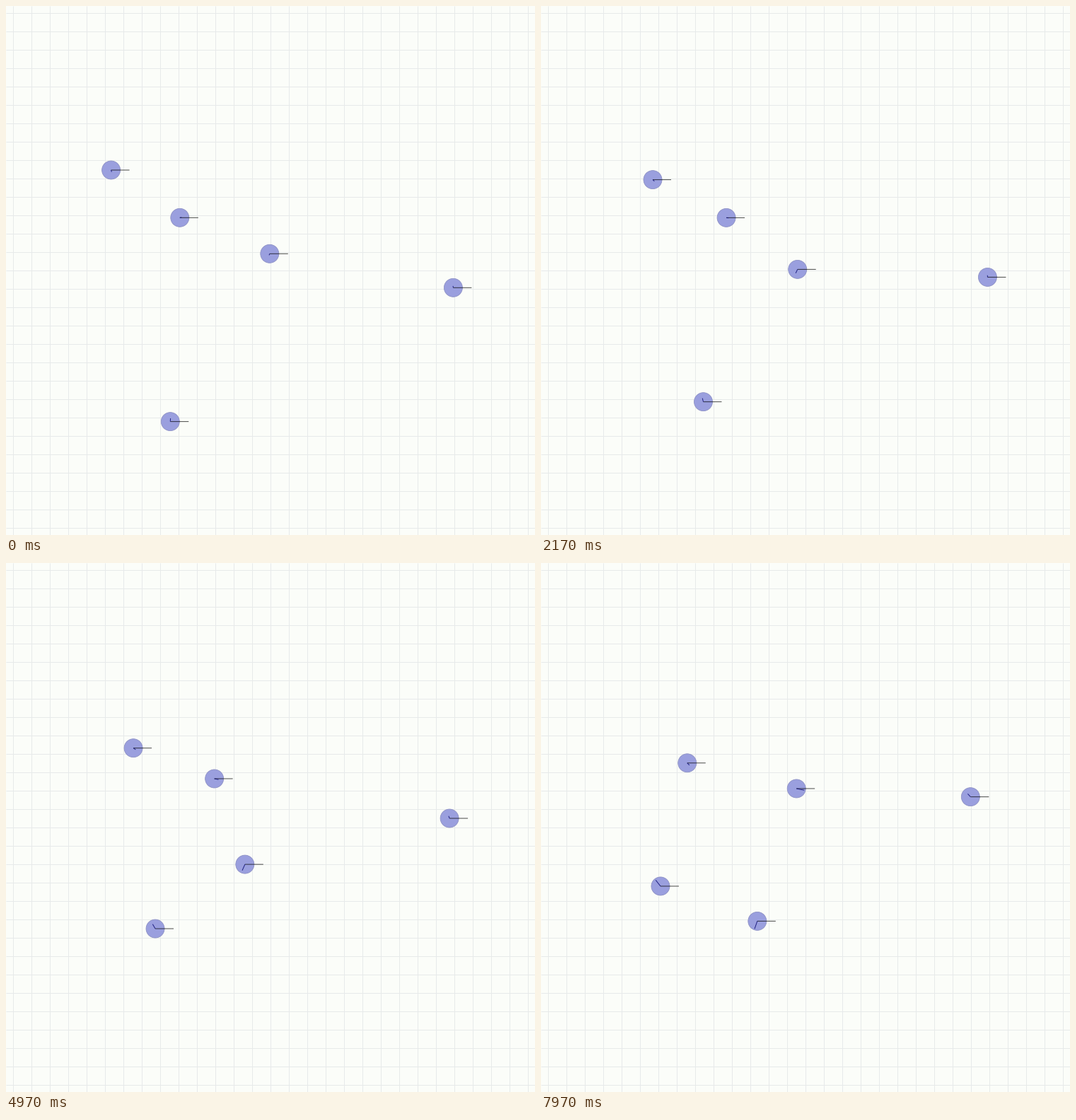
These frames come from a looping animation (748 px wide and 748 px high, 8000 ms). A matplotlib script:

```python
import matplotlib.pyplot as plt
import numpy as np
from matplotlib.animation import FuncAnimation
from matplotlib.collections import LineCollection
from matplotlib.patches import Circle

SIZE, DPI = 748, 100
PX = 72 / DPI                # one pixel in points
UNIT = SIZE / 28.8           # pixels per world unit
FRAMES, LOOP = 240, 8000
ARROW = 0.37                 # seconds of travel shown by a velocity line

# Each body drifts along a cubic through four key points at these seconds
KEY_TIMES = [0, 2.9, 4.97, 7.97]
BODIES = [
    [(148.6, 232.0), (163.0, 249.8), (180.1, 261.7), (206.8, 282.8)],
    [(245.8, 299.3), (268.8, 300.2), (294.7, 305.0), (361.3, 319.0)],
    [(372.8, 350.3), (357.2, 384.0), (337.8, 426.2), (305.8, 506.5)],
    [(632.4, 398.3), (631.0, 378.0), (627.1, 361.0), (607.3, 330.6)],
    [(232.3, 587.6), (226.4, 549.4), (211.0, 517.0), (168.9, 456.9)],
]


def draw_grid(ax):
    marks = SIZE / 2 + np.arange(-14, 15) * UNIT
    lines = [[(p, 0), (p, SIZE)] for p in marks]
    lines += [[(0, p), (SIZE, p)] for p in marks]
    ax.add_collection(LineCollection(lines, colors="#e7eaea", linewidths=PX, zorder=1))


class Body:
    def __init__(self, ax, points):
        self.path = [np.poly1d(np.polyfit(KEY_TIMES, c, 3)) for c in zip(*points)]
        self.speed = [p.deriv() for p in self.path]
        self.disc = Circle((0, 0), UNIT / 2, facecolor="#9a9fde",
                           edgecolor="#8b8fc3", linewidth=0.8 * PX, zorder=2)
        ax.add_patch(self.disc)
        style = dict(lw=PX, solid_capstyle="butt", snap=False)
        self.heading, = ax.plot([], [], color="black", alpha=0.7, zorder=3, **style)
        self.arrow, = ax.plot([], [], color="#15157a", alpha=0.9, zorder=4, **style)

    def move(self, t):
        x, y = (p(t) for p in self.path)
        vx, vy = (v(t) for v in self.speed)
        self.disc.center = x, y
        self.heading.set_data([x, x + UNIT], [y, y])
        self.arrow.set_data([x, x + ARROW * vx], [y, y + ARROW * vy])
        return self.disc, self.heading, self.arrow


fig = plt.figure(figsize=(SIZE / DPI, SIZE / DPI), dpi=DPI, facecolor="#fbfdf9")
ax = fig.add_axes([0, 0, 1, 1])
ax.set_xlim(0, SIZE)
ax.set_ylim(SIZE, 0)
ax.axis("off")

draw_grid(ax)
bodies = [Body(ax, points) for points in BODIES]


def update(frame):
    t = frame * LOOP / FRAMES / 1000
    return [artist for body in bodies for artist in body.move(t)]


anim = FuncAnimation(fig, update, frames=FRAMES, interval=LOOP / FRAMES,
                     init_func=lambda: update(0), repeat=True, repeat_delay=0)
plt.show()
```
